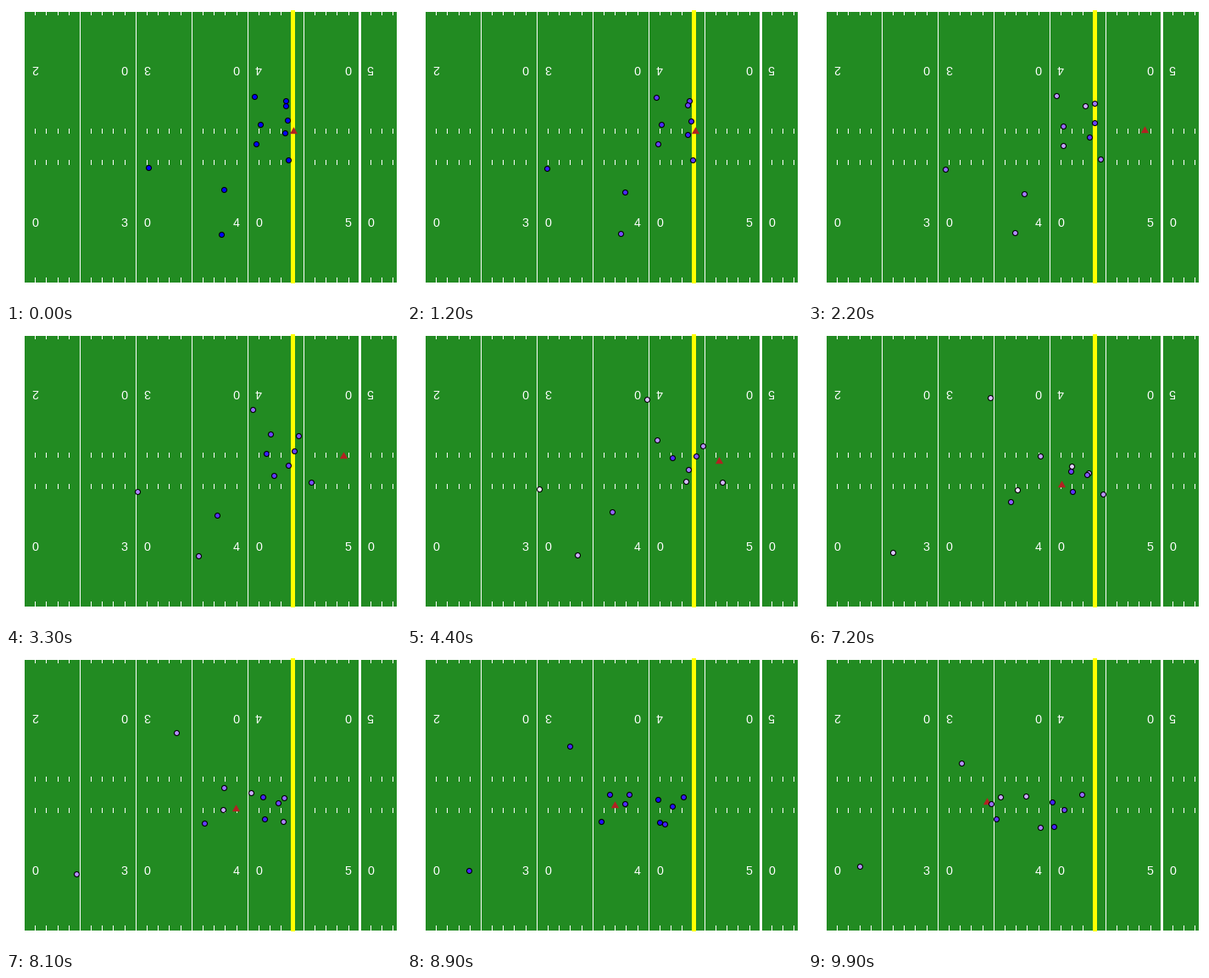
These frames come from a looping animation (466 px wide and 350 px high, 10 s). A matplotlib script:

```python
import numpy as np
import matplotlib.pyplot as plt
from matplotlib.animation import FuncAnimation
from matplotlib.patches import Rectangle

W, H, DPI = 466, 350, 100
FRAMES, INTERVAL = 100, 100
PX = 72 / DPI
YARD, X20 = 13.195, 20.93
LEFT, RIGHT, TOP, BOTTOM = 22, 461, 7, 327
BEATS = (0, 22, 44, 72, 99)
SPAN = 8
TRIANGLE = np.array([[0, -5.3], [4.6, 2.7], [-4.6, 2.7]])

fig = plt.figure(figsize=(W / DPI, H / DPI), dpi=DPI, facecolor="white")
ax = fig.add_axes([0, 0, 1, 1])
ax.set_xlim(0, W)
ax.set_ylim(H, 0)
ax.axis("off")


def box(x, y, w, h, color, z=1):
    ax.add_patch(Rectangle((x, y), w, h, fc=color, lw=0, antialiased=False, zorder=z))


def yard_x(yard):
    return X20 + YARD * (yard - 20)


def digit(x, y, char, angle):
    ax.text(x, y, char, color="white", family="Liberation Sans", size=14.2 * PX,
            ha="center", va="baseline", rotation=angle, rotation_mode="anchor", zorder=3)


def draw_field():
    box(LEFT, TOP, RIGHT - LEFT, BOTTOM - TOP, "#228B22")
    for yard in range(21, 54):
        x = round(yard_x(yard))
        for y, h in ((TOP, 4), (145, 6), (182, 6), (BOTTOM - 6, 6)):
            box(x, y, 1, h, "white", 2)
        if yard % 5 == 0:
            wide = yard == 50
            box(x - wide, TOP, 1 + 2 * wide, BOTTOM - TOP, "white", 2)
    for yard in range(20, 51, 10):
        tens = str(yard // 10)
        for side, low, high in ((-1, tens, "0"), (1, "0", tens)):
            x = yard_x(yard + side)
            if LEFT < x < RIGHT:
                digit(x, 261, low, 0)
                digit(x, 70, high, 180)
    box(336, TOP - 2, 5, BOTTOM - TOP + 3, "yellow", 4)


def route(points, n, beats=BEATS):
    """Positions at times n on a smooth curve that starts at rest."""
    t, p = np.array(beats, float), np.array(points, float)
    m = np.gradient(p, t, axis=0)
    m[0] = 0
    n = np.maximum(n, t[0])
    i = np.clip(np.searchsorted(t, n, "right") - 1, 0, len(t) - 2)
    k = (t[i + 1] - t[i])[:, None]
    s = (n - t[i])[:, None] / k
    return (p[i] * (1 + 2 * s) * (1 - s) ** 2 + m[i] * k * s * (1 - s) ** 2
            + p[i + 1] * s * s * (3 - 2 * s) + m[i + 1] * k * s * s * (s - 1))


def blue_to_white(t):
    """Blend from blue to white in CIE Lab."""
    L, a, b = 32.3 + 67.7 * t, 79.19 * (1 - t), -107.86 * (1 - t)
    fy = (L + 16) / 116
    f = np.stack([fy + a / 500, fy, fy - b / 200])
    xyz = np.where(f > 6 / 29, f ** 3, 3 * (6 / 29) ** 2 * (f - 4 / 29))
    xyz = xyz * np.array([[0.9505], [1.0], [1.089]])
    rgb = np.array([[3.2406, -1.5372, -0.4986],
                    [-0.9689, 1.8758, 0.0415],
                    [0.0557, -0.2040, 1.0570]]) @ xyz
    rgb = np.clip(rgb, 0, 1)
    rgb = np.where(rgb > 0.0031308, 1.055 * rgb ** (1 / 2.4) - 0.055, 12.92 * rgb)
    return np.clip(rgb, 0, 1).T


def shade(points):
    """Players grow paler the harder they accelerate."""
    n = np.arange(FRAMES)
    before, now, after = (route(points, n + d) for d in (-SPAN, 0, SPAN))
    accel = np.hypot(*(before - 2 * now + after).T) / SPAN ** 2
    return (1 - np.exp(-accel / 0.11)) * np.minimum(n / BEATS[1], 1)


def snap(p):
    return np.round(p) + 0.5


# Waypoints at each beat: the secondary first and last, the front in between.
PLAYERS = [
    [(293, 107), (293, 106), (283, 82), (215, 80), (181, 129)],
    [(330, 112), (338, 115), (349, 137), (331, 169), (323, 166)],
    [(330, 118), (327, 118), (295, 130), (274, 149), (216, 177)],
    [(332, 135), (338, 138), (341, 149), (329, 171), (302, 184)],
    [(300, 140), (301, 142), (313, 151), (311, 161), (227, 169)],
    [(329, 150), (332, 155), (332, 165), (310, 167), (288, 175)],
    [(295, 163), (301, 165), (329, 179), (312, 191), (290, 204)],
    [(333, 182), (345, 181), (372, 180), (348, 194), (274, 205)],
    [(168, 191), (162, 193), (156, 188), (247, 189), (257, 168)],
    [(257, 217), (255, 222), (242, 215), (239, 203), (222, 195)],
    [(254, 270), (244, 268), (201, 266), (100, 263), (61, 251)],
]
BALL = [(339, 148), (401, 147), (368, 155), (299, 183), (211, 175)]

clock = np.arange(FRAMES)
paths = snap(np.array([route(p, clock) for p in PLAYERS]))
shades = np.array([shade(p) for p in PLAYERS])
ball = snap(route(BALL, clock, (11, 23) + BEATS[2:]))

draw_field()
ball_patch = plt.Polygon(TRIANGLE + ball[0], fc="#B22222", lw=0, zorder=5)
ax.add_patch(ball_patch)
dots = ax.scatter(*paths[:, 0].T, s=(6 * PX) ** 2, c=blue_to_white(shades[:, 0]),
                  edgecolors="black", linewidths=1.1 * PX, zorder=6)


def update(n):
    ball_patch.set_xy(TRIANGLE + ball[n])
    dots.set_offsets(paths[:, n])
    dots.set_facecolors(blue_to_white(shades[:, n]))
    return ball_patch, dots


anim = FuncAnimation(fig, update, frames=FRAMES, interval=INTERVAL,
                     repeat=True, repeat_delay=0)
plt.show()
```
